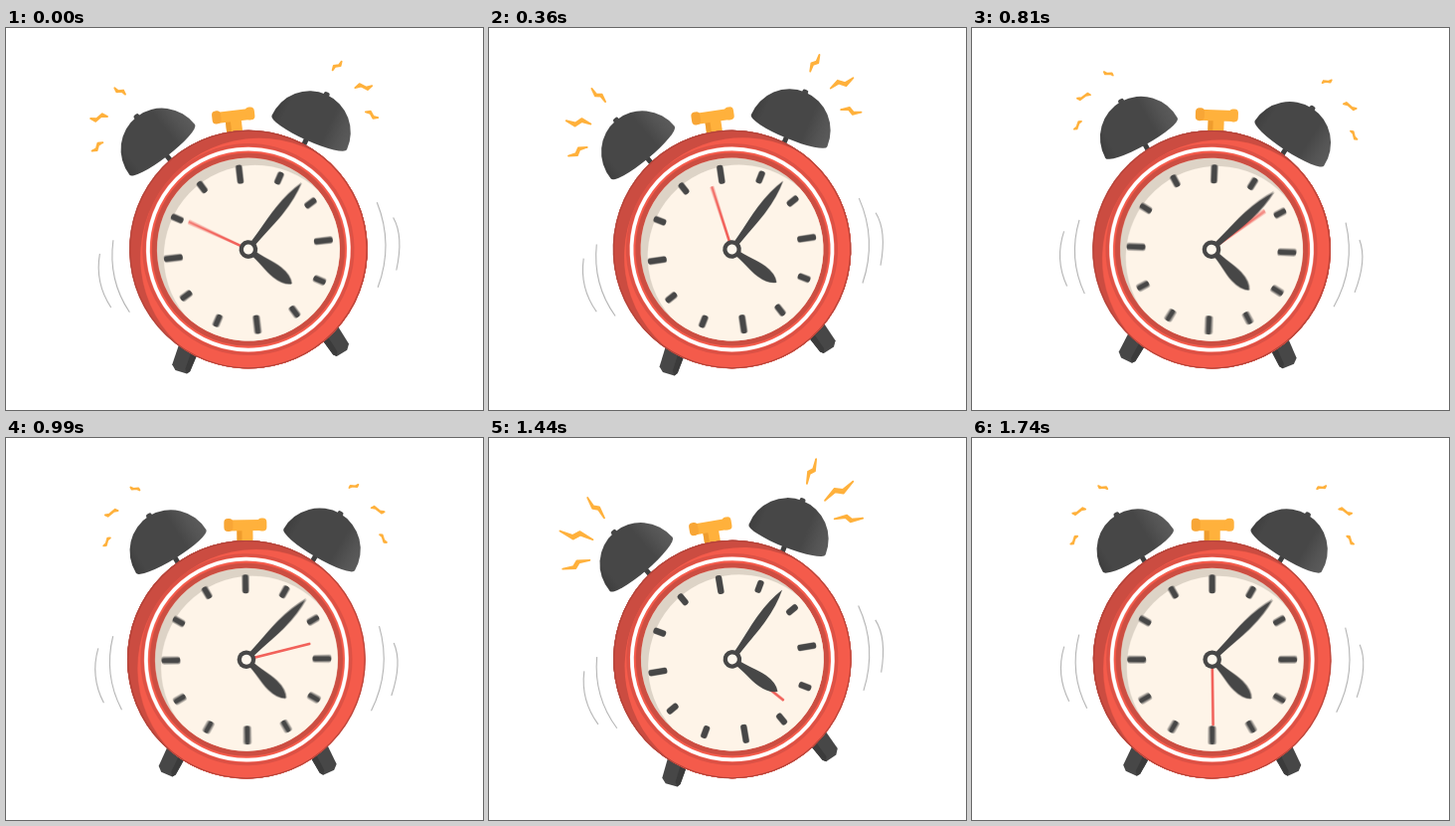
Recreate the animation shown at these times as an HTML page with a canvas. Size 480 px wide and 384 px high, loop 1770 ms.

```html
<!DOCTYPE html>
<html lang="en">
<head>
<meta charset="utf-8">
<title>Ringing alarm clock</title>
<style>
html, body { margin: 0; height: 100%; overflow: hidden; background: #fff; }
canvas { display: block; }
</style>
</head>
<body>
<canvas id="stage" width="480" height="384"></canvas>
<script>
const LOOP = 1770, STEP = 30, BLUR = 10, SAMPLES = 5;
const DARK = '#474747', ORANGE = '#ffb13c', RED = '#f45b4b';
const rad = Math.PI / 180;
const screen = document.getElementById('stage').getContext('2d');
const layer = document.createElement('canvas');
layer.width = 480;
layer.height = 384;
const c = layer.getContext('2d');

function local(draw) {
  c.save();
  draw();
  c.restore();
}

function disc(x, y, r, color) {
  c.fillStyle = color;
  c.beginPath();
  c.arc(x, y, r, 0, 2 * Math.PI);
  c.fill();
}

function ring(r, width, color) {
  c.strokeStyle = color;
  c.lineWidth = width;
  c.beginPath();
  c.arc(0, 0, r, 0, 2 * Math.PI);
  c.stroke();
}

// A disc whose upper left edge lies in shadow.
function shadedDisc(r, color, shade, dx, dy) {
  local(() => {
    disc(0, 0, r, shade);
    c.clip();
    disc(dx, dy, r, color);
  });
}

function polygon(points, color) {
  c.fillStyle = color;
  c.beginPath();
  points.forEach(([x, y]) => c.lineTo(x, y));
  c.closePath();
  c.fill();
}

function bar(x, y, w, h, r, color) {
  c.fillStyle = color;
  c.beginPath();
  c.roundRect(x, y, w, h, r);
  c.fill();
}

function leg(side) {
  local(() => {
    c.scale(side, 1);
    polygon([[80, 86], [89.5, 106], [87, 112], [76, 117], [72.5, 115], [60, 93]], DARK);
    polygon([[66, 90], [60, 93], [72.5, 115], [76, 117], [77, 112]], '#3b3b3b');
  });
}

function bell(side) {
  local(() => {
    c.translate(side * 74.5, -109.5);
    c.rotate(side * 31 * rad);
    bar(-2.5, 0, 5, 16, 1, '#3f3f3f');
    bar(-3, -44.5, 6, 6, 2, DARK);
    const shade = c.createLinearGradient(-42, 0, 42, 0);
    shade.addColorStop(0, '#3e3e3e');
    shade.addColorStop(0.14, DARK);
    shade.addColorStop(0.68, DARK);
    shade.addColorStop(0.85, '#545454');
    shade.addColorStop(1, '#5c5c5c');
    c.fillStyle = shade;
    c.beginPath();
    c.ellipse(0, 0, 41.5, 42, 0, Math.PI, 2 * Math.PI);
    c.ellipse(0, 0, 41.5, 8, 0, 0, Math.PI);
    c.fill();
  });
}

function button() {
  bar(-8, -131, 16, 14, 0, ORANGE);
  bar(-8, -131, 5, 14, 0, '#ef9c2d');
  bar(-18, -140.5, 36, 11, 1, ORANGE);
  bar(-21, -142, 9, 13, 4, '#f8a636');
  bar(13, -142, 9, 13, 4, ORANGE);
}

function arcLine(x1, y1, cx, cy, x2, y2) {
  c.beginPath();
  c.moveTo(x1, y1);
  c.quadraticCurveTo(cx, cy, x2, y2);
  c.stroke();
}

function shakeLines() {
  c.strokeStyle = '#b4b4b4';
  c.lineWidth = 1.1;
  arcLine(-149, -13, -157.5, 15.5, -144, 42);
  arcLine(-134, -25, -144, 14, -126, 49);
  arcLine(134, -32, 146, 12, 125, 53);
  arcLine(148.5, -15, 157, 5, 145.5, 38);
}

// Zigzag spark, squeezed along its length by the given amount.
function spark(x, y, angle, length, width, squeeze) {
  local(() => {
    c.translate(x, y);
    c.rotate(angle * rad);
    const half = [[-0.5, -0.5], [-0.1, -0.2], [0.02, 0.42]];
    const shape = [...half, ...half.map(([u, w]) => [-u, -w])]
      .map(([u, w]) => [u * length * squeeze, -w * width]);
    polygon(shape, ORANGE);
    c.strokeStyle = ORANGE;
    c.lineWidth = 1.8;
    c.lineJoin = 'round';
    c.stroke();
  });
}

function sparks(side, squeeze) {
  local(() => {
    c.scale(side, 1);
    spark(-110, -173, 78, 26, 8.2, squeeze);
    spark(-134, -149, 45, 33, 12, squeeze);
    spark(-139, -120, 10, 28, 9, squeeze);
  });
}

// Leaf-shaped hand pointing up before rotation.
function hand(angle, length, width, belly, tip) {
  local(() => {
    c.rotate(angle * rad);
    c.fillStyle = DARK;
    c.beginPath();
    c.moveTo(-2.5, 0);
    c.bezierCurveTo(-3, -belly * 0.5, -width / 2, -belly * 0.7, -width / 2, -belly);
    c.quadraticCurveTo(-width / 2, -tip, 0, -length);
    c.quadraticCurveTo(width / 2, -tip, width / 2, -belly);
    c.bezierCurveTo(width / 2, -belly * 0.7, 3, -belly * 0.5, 2.5, 0);
    c.fill();
  });
}

function face(t) {
  shadedDisc(119.7, RED, '#cb4c41', 10, 9);
  ring(119.2, 1, '#b2443a');
  ring(105, 3, '#dc5145');
  ring(101, 3.8, '#fff');
  ring(94.5, 5, '#cc4e42');
  shadedDisc(92, '#fef4e8', '#ddd3c6', 6, 8);
  for (let i = 0; i < 12; i++) local(() => {
    c.rotate(i * 30 * rad);
    if (i % 3) bar(-3.2, -84.5, 6.4, 13, 2.5, DARK);
    else bar(-3.2, -85.5, 6.4, 19, 2.5, DARK);
  });
  local(() => {
    c.rotate((301.4 + t * 4.1 / STEP) * rad);
    bar(-1.3, -66.5, 2.6, 66.5, 1, '#f2615a');
  });
  hand(45.3, 86, 9.5, 50, 70);
  hand(135, 56, 13, 37, 50);
  disc(0, 0, 9.3, DARK);
  disc(0, 0, 5, '#fff8ee');
}

const swing = t => -Math.sin((t - 1740) / 60);

// Draws around the clock's centre, rocking about a point above it.
function rocked(t, draw) {
  local(() => {
    c.translate(241.7, 203.7);
    c.rotate(swing(t) * 10 * rad);
    c.translate(0, 19);
    draw();
  });
}

function surroundings(t) {
  const squeeze = 0.19 + 0.92 * swing(t) ** 4;
  shakeLines();
  for (const side of [-1, 1]) {
    sparks(side, squeeze);
    leg(side);
    bell(side);
  }
  button();
}

// The face is averaged over several moments for motion blur; the rest stays crisp.
function frame(now) {
  const t = Math.floor(now % LOOP / STEP) * STEP;
  c.fillStyle = '#fff';
  c.fillRect(0, 0, 480, 384);
  rocked(t, () => surroundings(t));
  for (let i = 0; i < SAMPLES; i++) {
    const moment = t + BLUR * (i / (SAMPLES - 1) - 0.5);
    rocked(moment, () => face(moment));
    screen.globalAlpha = 1 / (i + 1);
    screen.drawImage(layer, 0, 0);
  }
  requestAnimationFrame(() => frame(performance.now() - start));
}

const start = performance.now();
frame(0);
</script>
</body>
</html>
```
